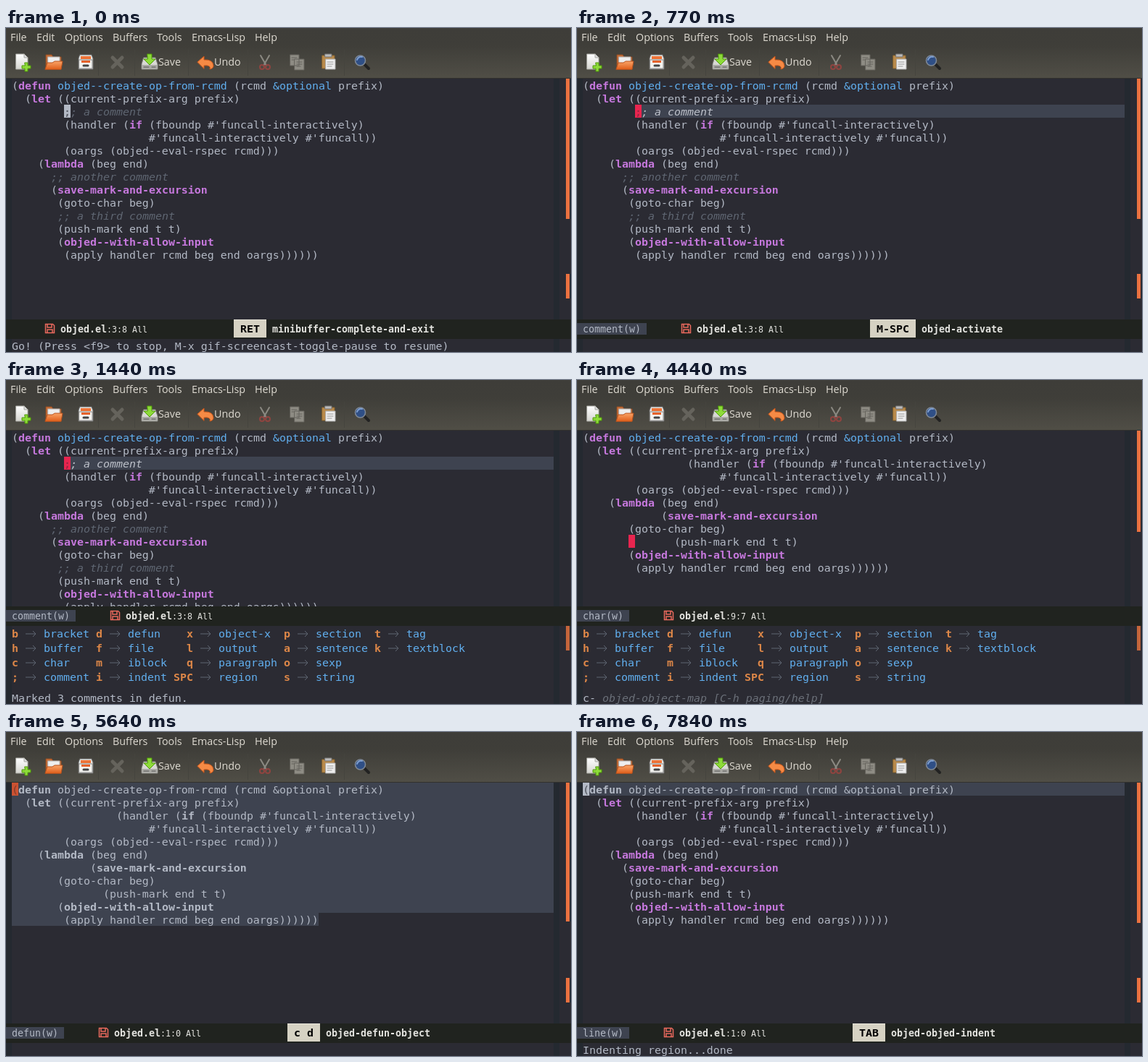
These frames come from a looping animation (779 px wide and 448 px high, 9840 ms). An HTML page:

```html
<!DOCTYPE html>
<html lang="en">
<head>
<meta charset="utf-8">
<title>objed</title>
<style>
html, body { margin: 0; width: 100%; height: 100%; overflow: hidden; background: #2b2b33 }
svg { display: block }
text { white-space: pre; font-family: "DejaVu Sans Mono", monospace }
.ui { font: 14.3px "Open Sans", sans-serif; fill: #dfdbd2 }
.b { font-weight: bold }
.i { font-style: italic }
</style>
</head>
<body>
<svg width="779" height="448" viewBox="0 0 779 448">
  <defs>
    <linearGradient id="bar" x2="0" y2="1">
      <stop stop-color="#3e3d39"/><stop offset=".35" stop-color="#3f3e39"/><stop offset="1" stop-color="#504e46"/>
    </linearGradient>
    <linearGradient id="folder" x2="0" y2="1"><stop stop-color="#f9a468"/><stop offset="1" stop-color="#e0601c"/></linearGradient>
    <linearGradient id="paper" x2="0" y2="1"><stop stop-color="#fff"/><stop offset="1" stop-color="#d5d5d0"/></linearGradient>
  </defs>
  <rect width="779" height="448" fill="#2b2b33"/>
  <path d="M0 70h8v378H0zM755 70h8v378h-8z" fill="#242930"/>
  <rect width="779" height="69" fill="url(#bar)"/>
  <path d="M0 69.5h779" stroke="#32312d"/>
  <path d="M127.500 30v36M177.500 30v36M251.500 30v36M333.500 30v36M466.500 30v36" stroke="#45443e"/>
  <g id="menu"></g>
  <g id="icons" stroke-linejoin="round" stroke-linecap="round">
    <path d="M14 36h11l5 5v16H14z" fill="url(#paper)" stroke="#a9a9a3"/>
    <path d="M25 36v5h5" fill="#ddd" stroke="#a9a9a3"/>
    <path d="M26 48h4v4h4v4h-4v4h-4v-4h-4v-4h4z" fill="#8edb3a" stroke="#4e9a06"/>
    <path d="M55 56V37h8l2 3h11v16z" fill="#c9703a" stroke="#8c4a22"/>
    <path d="M58 40h16v13H58z" fill="#eee" stroke="#aaa"/>
    <path d="M54 57l3-9h7l3-2h11l-2 11z" fill="url(#folder)" stroke="#b9531d"/>
    <path d="M102 37h16l2 5v15h-20V42z" fill="#e4e4e0" stroke="#666"/>
    <path d="M103 39h14v4h-14z" fill="#ee7438"/>
    <path d="M101 44h18v12h-18z" fill="#f3f3f0" stroke="#888"/>
    <path d="M104 45h12v3h-12z" fill="#e56129"/>
    <path d="M107 52h6" stroke="#444" stroke-width="3"/>
    <path d="M147 41l13 13M160 41l-13 13" stroke="#65635c" stroke-width="5"/>
    <path d="M190 41h16l3 9v7h-22v-7z" fill="#d8d8d4" stroke="#83837e"/>
    <path d="M188 51h20v5h-20z" fill="#aaaaa5"/>
    <path d="M190 54h7M201 54h5" stroke="#555"/>
    <path d="M195 36h6v7h5l-8 8-8-8h5z" fill="#8edb3a" stroke="#4e9a06"/>
    <path d="M264 47l9-8v5q12-1 13 8 0 4-5 5 2-6-8-5v4z" fill="#f58a45" stroke="#c95519"/>
    <path d="M351 38l8 14M363 38l-8 14" stroke="#8b8982" stroke-width="2"/>
    <g fill="none" stroke="#8f4440" stroke-width="2"><circle cx="353" cy="54" r="3"/><circle cx="361" cy="54" r="3"/></g>
    <g fill="#8e8c84" stroke="#65635c">
      <path d="M392 37h12v15h-12zM398 43h13v15h-13z"/>
      <path d="M394 41h7M394 44h3M401 47h7M401 50h7M401 53h5"/>
    </g>
    <path d="M436 38h17v18h-17z" fill="#b98a4b" stroke="#82602f"/>
    <path d="M440 36h9v4h-9z" fill="#bbb" stroke="#777"/>
    <path d="M441 43h13v14h-13z" fill="#eee" stroke="#aaa"/>
    <path d="M443 47h8M443 50h8M443 53h6" stroke="#999"/>
    <path d="M494 50l6 6" stroke="#222" stroke-width="4"/>
    <circle cx="488.500" cy="45" r="7" fill="#2f4f86" stroke="#7d8794" stroke-width="1.600"/>
    <path d="M484 44q2-5 7-4" fill="none" stroke="#7f9fd0" stroke-width="2"/>
  </g>
  <g id="scene"></g>
</svg>
<script>
const FG = '#b3b9c5', DIM = '#5f6672', BLUE = '#61afef', PURPLE = '#c678dd';
const REGION = '#3e4350', MARKED = '#676964', RED = '#e8254f', BRIGHT = '#ec7140', DULL = '#c5653b';
const byId = id => document.getElementById(id);
const escape = s => s.replace(/&/g, '&amp;').replace(/</g, '&lt;');
const rect = (x, y, w, h, fill) => `<rect x="${x}" y="${y}" width="${w}" height="${h}" fill="${fill}"/>`;
const text = (x, y, s, fill = FG, cls = '', size = 14.95) =>
  `<text x="${x}" y="${y}" fill="${fill}" class="${cls}" font-size="${size}">${escape(s)}</text>`;

const menu = [[6, 'File'], [42, 'Edit'], [81, 'Options'], [147, 'Buffers'], [208, 'Tools'], [256, 'Emacs-Lisp'], [343, 'Help']];
byId('menu').innerHTML = menu.map(([x, s]) => text(x, 18, s, '', 'ui')).join('') +
  text(210, 52, 'Save', '', 'ui') + text(287, 52, 'Undo', '', 'ui');

const commented = `(defun objed--create-op-from-rcmd (rcmd &optional prefix)
  (let ((current-prefix-arg prefix)
        ;; a comment
        (handler (if (fboundp #'funcall-interactively)
                     #'funcall-interactively #'funcall))
        (oargs (objed--eval-rspec rcmd)))
    (lambda (beg end)
      ;; another comment
      (save-mark-and-excursion
       (goto-char beg)
       ;; a third comment
       (push-mark end t t)
       (objed--with-allow-input
        (apply handler rcmd beg end oargs))))))`.split('\n');
const indented = commented.filter(line => !line.includes(';;'));
const deleted = indented.map(line =>
  line.replace(/^ +(?=\((handler|save|push))/, (pad, word) => pad + ' '.repeat({ handler: 8, save: 6, push: 7 }[word])));

const syntax = /(;;.*|(?<=\()(?:defun|let|if|lambda|save-mark-and-excursion|objed--with-allow-input)(?![\w-])|objed--create[\w-]*|&optional)/;
const column = c => 8 + 9 * c, rowTop = r => 70 + 18 * r, baseline = r => rowTop(r) + 15;

function code(lines, tint = () => null) {
  return lines.map((line, row) => {
    let col = 0;
    return line.split(syntax).map((part, i) => {
      const comment = part.startsWith(';;'), blue = /^(objed--create|&)/.test(part);
      const [color, cls] = i % 2 == 0 ? [FG, ''] : comment ? [DIM, 'i'] : blue ? [BLUE, ''] : [PURPLE, 'b'];
      const out = text(column(col), baseline(row), part, tint(row) || color, cls);
      col += part.length;
      return out;
    }).join('');
  }).join('');
}

const highlight = (row, col, fill, end = 755) => rect(column(col), rowTop(row), end - column(col), 18, fill);
const cursor = (row, col, fill, char, ink) =>
  rect(column(col), rowTop(row), 9, 18, fill) + text(column(col), baseline(row), char, ink);
const thumb = (top, bottom, fill) => rect(772, top, 5, bottom - top, fill);
const thumbs = (bottom, fill = BRIGHT, lower = fill) => thumb(70, bottom, fill) + thumb(340, 374, lower);
const message = s => text(8, 445, s);

function modeline(label, pos, key, command, y = 403) {
  const left = label ? 8 * label.length + 16 : 6, x = left + 69, base = y + 18;
  let out = rect(0, y, 779, 27, '#20231f');
  if (label) out += rect(0, y + 5, left, 16, REGION) + text(8, base, label, FG, '', 13.29);
  out += `<path transform="translate(${left + 48} ${y + 6})" d="M.5 .5h10l2 2v10H.5zM3 1v4h6V1M3 12V8h7v4" fill="none" stroke="#ea6a5e" stroke-width="1.500"/>`;
  out += text(x, base, 'objed.el', '#e4e4e0', 'b', 13.29) + text(x + 64, base, pos + ' All', '#e4e4e0', '', 11.63);
  if (key) {
    const box = x + 239, width = 9 * key.length + 18;
    out += rect(box, y, width, 25, '#d6d2c3') + rect(box, y, width, 1, '#e9e6da');
    out += text(box + 9, base, key, '#000', 'b') + text(box + width + 8, base, command, '#e4e4e0', 'b', 13.29);
  }
  return out;
}

const hints = [
  [8, 'b bracket,h buffer,c char,; comment'],
  [124, 'd defun,f file,m iblock,i indent'],
  [249, 'x object-x,l output,q paragraph,SPC region'],
  [383, 'p section,a sentence,o sexp,s string'],
  [508, 't tag,k textblock']
];
const popup = (label, pos) => rect(8, 313, 747, 135, '#2b2b33') + modeline(label, pos, '', '', 313) +
  hints.map(([x, list]) => list.split(',').map((hint, i) => {
    const [key, name] = hint.split(' '), y = 356 + 20 * i;
    return text(x + 9 - 9 * key.length, y, key, '#dd8748', 'b') + text(x + 44, y, name, BLUE) +
      `<path d="M${x + 19} ${y - 5}h14m-4 -4l4 4l-4 4" fill="none" stroke="${DIM}"/>`;
  }).join('')).join('');

const lightComment = row => row == 2 && '#bdc1ca';
const start = ink => cursor(2, 8, RED, ';', ink);
const lineMarked = highlight(2, 8, REGION) + code(commented, lightComment) + start('#8f2440');
const activated = modeline('comment(w)', ':3:8', 'M-SPC', 'objed-activate') + thumbs(264);

const scenes = [
  [0, code(commented) + cursor(2, 8, FG, ';', '#4a4e58') + thumbs(264) +
    modeline('', ':3:8', 'RET', 'minibuffer-complete-and-exit') +
    message('Go! (Press <f9> to stop, M-x gif-screencast-toggle-pause to resume)')],
  [100, code(commented) + start('#8f2440') + activated],
  [770, lineMarked + activated],
  [1440, lineMarked + popup('comment(w)', ':3:8') + thumb(340, 374, DULL) + message('Marked 3 comments in defun.')],
  [2440, highlight(2, 8, MARKED) + highlight(7, 6, MARKED) + highlight(10, 7, MARKED) +
    code(commented, lightComment) + start('#b83a55') + thumbs(253, DULL) +
    modeline('comment(w)', ':3:8', '* d', 'objed-defun-object') + message('Marked 3 comments in defun.')],
  [4440, code(deleted) + cursor(8, 7, RED, '') + popup('char(w)', ':9:7') + thumbs(210, BRIGHT, DULL) +
    message('c-') + text(35, 445, 'objed-object-map [C-h paging/help]', '#6a6f78', 'i')],
  [5640, indented.map((_, row) => highlight(row, 0, REGION, row == 10 ? 431 : 755)).join('') +
    code(deleted, () => FG) + cursor(0, 0, '#cb5232', '(', '#7d3c2c') + thumbs(262) +
    modeline('defun(w)', ':1:0', 'c d', 'objed-defun-object')],
  [7840, highlight(0, 0, REGION) + code(indented, row => row == 0 && FG) + cursor(0, 0, FG, '(', '#4a4e58') +
    thumbs(264) + modeline('line(w)', ':1:0', 'TAB', 'objed-objed-indent') + message('Indenting region...done')]
];

let shown;
function draw() {
  const time = performance.now() % 9840;
  const scene = scenes.findLast(([from]) => from <= time);
  if (scene != shown) byId('scene').innerHTML = (shown = scene)[1];
  requestAnimationFrame(draw);
}
draw();
</script>
</body>
</html>
```
